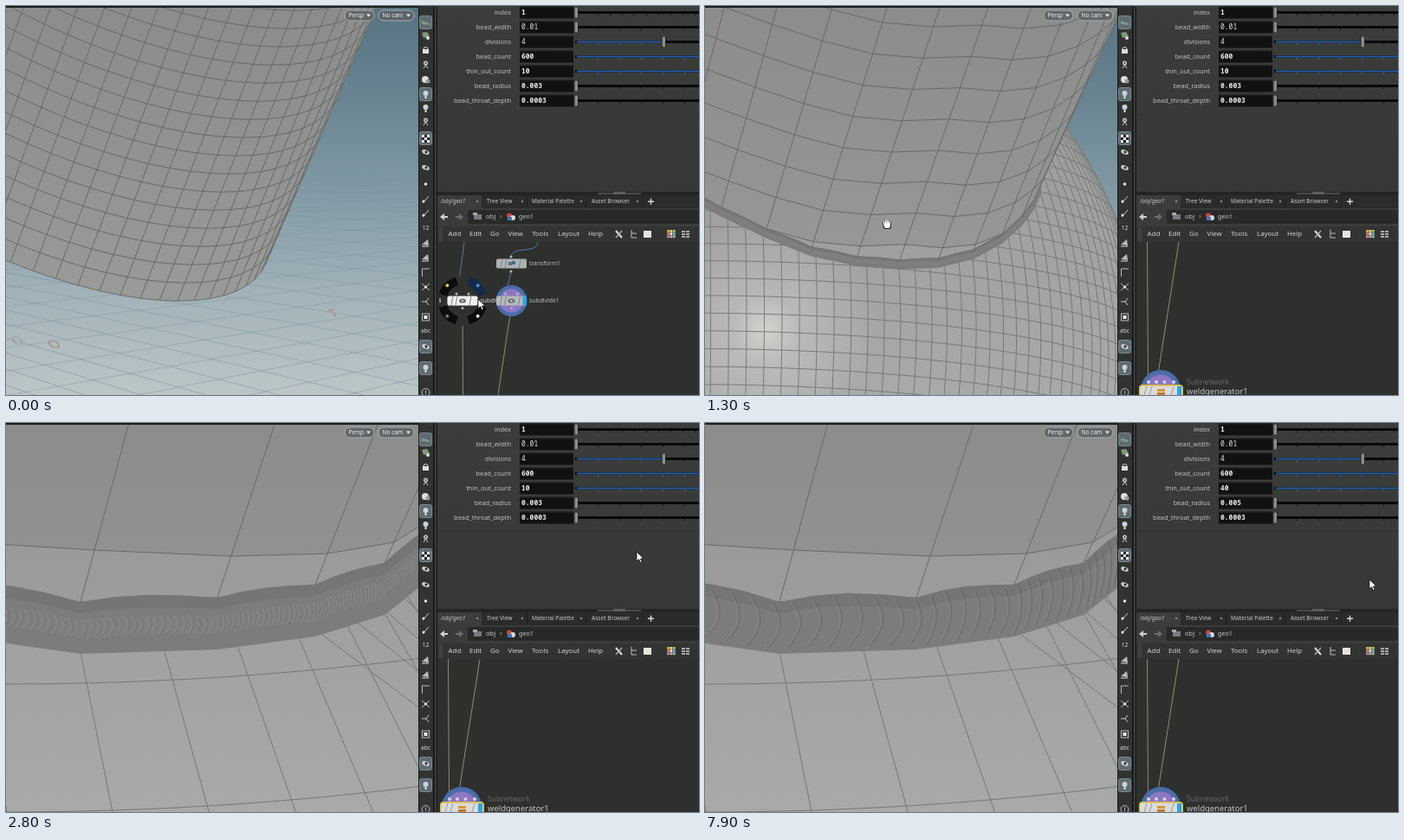
Recreate the animation shown at these times as an HTML page with a canvas. Size 800 px wide and 450 px high, loop 8 s.

```html
<!DOCTYPE html>
<html>
<head>
<meta charset="utf-8">
<style>
  html, body { margin: 0; width: 100%; height: 100%; overflow: hidden; background: #2e302e; }
  canvas { display: block; }
</style>
</head>
<body>
<canvas id="stage" width="800" height="450"></canvas>
<script>
const c = document.getElementById('stage').getContext('2d');
const LOOP = 8000, TAU = Math.PI * 2;
const lerp = (a, b, u) => a + (b - a) * u;
const ease = u => u * u * (3 - 2 * u);
const mix = (a, b, u) => a.map((v, i) => Array.isArray(v) ? mix(v, b[i], u) : lerp(v, b[i], u));
const noise = n => { const s = Math.sin(n * 127.1) * 43758.5; return s - Math.floor(s); };

function rect(x, y, w, h, fill) { c.fillStyle = fill; c.fillRect(x, y, w, h); }
function pill(x, y, w, h, r, fill, line) {
  c.beginPath(); c.roundRect(x, y, w, h, r);
  if (fill) { c.fillStyle = fill; c.fill(); }
  if (line) { c.strokeStyle = line; c.stroke(); }
}
function disc(x, y, r, fill) { c.fillStyle = fill; c.beginPath(); c.arc(x, y, r, 0, TAU); c.fill(); }
function trace(pts) { c.beginPath(); pts.forEach(p => c.lineTo(p[0], p[1])); }
function line(pts, color, w = 1) { trace(pts); c.strokeStyle = color; c.lineWidth = w; c.stroke(); c.lineWidth = 1; }
function fill(pts, color) { trace(pts); c.fillStyle = color; c.fill(); }
function text(s, x, y, size = 7.4, color = '#c8c9c8', style = '', align = 'left', family = '"Noto Sans", sans-serif') {
  c.font = `${style} ${size}px ${family}`;
  c.textAlign = align; c.textBaseline = 'middle'; c.fillStyle = color;
  c.fillText(s, x, y);
}
function gradient(y0, y1, ...stops) {
  const g = c.createLinearGradient(0, y0, 0, y1);
  stops.forEach((s, i) => g.addColorStop(i / (stops.length - 1), s));
  return g;
}
function glow(x, y, r, a) {
  const g = c.createRadialGradient(x, y, 0, x, y, r);
  g.addColorStop(0, `rgba(255,255,250,${a})`); g.addColorStop(0.3, `rgba(255,255,250,${a * .45})`);
  g.addColorStop(1, 'rgba(255,255,250,0)');
  rect(x - r, y - r, 2 * r, 2 * r, g);
}

// ---------- 3D view ----------
function backdrop() {
  rect(0, 0, 476, 450, gradient(0, 450, '#577382', '#6a8492', '#849ca8', '#a3b3b9', '#bcc6c8'));
  for (let n = 1; n < 40; n++) {
    const d = 5 + n * n * 0.55 + n * 4, a = Math.min(.5, .08 + n * .02);
    line([[-700, 185], [800, 185 + d * 1.4]], `rgba(112,138,152,${a})`);
    line([[1500, 185], [-100, 185 + d * 1.5]], `rgba(112,138,152,${a})`);
  }
}
function floorMarks() {
  for (const [x, y, s, col] of [[14, 388, '0', '#9aa0a3'], [56, 392, '0', '#b08f86'], [378, 356, '1', '#b08f86']]) {
    c.save(); c.translate(x, y); c.transform(1.3, -.15, .5, .7, 0, 0);
    text(s, 0, 0, 18, col, '', 'center'); c.restore();
  }
}

// Pose: [edge x, edge y, [slope, slope step, gap, gap step, row size], weld height, columns, rows, ball, closeness to the ball]
const angles = Array.from({ length: 21 }, (_, i) => (100 - 5 * i) * Math.PI / 180);
const cylinder = [
  angles.map(a => 4 + 296 * Math.cos(a) - 51 * Math.sin(a)),
  angles.map(a => 153 + 145 * Math.cos(a) + 120 * Math.sin(a)),
  [.355, .0037, 21, 0, 21]
];
const poses = [
  [1300, [
    [-30, 20, 72, 124, 176, 225, 270, 310, 343, 366, 380, 388],
    [207, 233, 258, 279, 290, 294, 292, 282, 264, 243, 224, 205],
    [.26, .018, 18, -6, 36], 11, [225, 300, 17.6, .25, .13, .011], [245, 21, 0, 0], [-13, 443, 526], 1]],
  [1700, [
    [-480, -365, -245, -125, -8, 107, 222, 316, 395, 447, 490, 520],
    [110, 140, 170, 190, 200, 209, 198, 183, 157, 129, 88, 40],
    [-.03, .05, 35, -5, 130], 38, [108, 250, 72, 3.5, .16, .07], [273, 88, .02, .00014], [-500, 1100, 1600], 0]],
  [2200, [
    [-680, -530, -380, -225, -70, 86, 244, 357, 437, 490, 525, 550],
    [80, 110, 140, 170, 185, 207, 202, 187, 162, 120, 70, 20],
    [-.03, .06, 60, -12, 190], 60, [85, 260, 97, 5.5, .2, .075], [302, 148, 0, .00013], [-700, 1700, 2400], 0]]
];
function poseAt(t) {
  if (t <= poses[0][0]) return poses[0][1];
  for (let i = 1; i < poses.length; i++)
    if (t < poses[i][0]) {
      const [a, b] = [poses[i - 1], poses[i]];
      return mix(a[1], b[1], (t - a[0]) / (b[0] - a[0]));
    }
  return poses[2][1];
}
function edge([xs, ys], i) {
  const k = Math.max(0, Math.min(xs.length - 2, Math.floor(i))), u = i - k;
  return [lerp(xs[k], xs[k + 1], u), lerp(ys[k], ys[k + 1], u)];
}
function tube(pose, welded) {
  const [xs, , [slope, slopeK, gap, gapK, size]] = pose, last = xs.length - 1;
  const up = (i, d) => { const [x, y] = edge(pose, i); return [x + (slope + slopeK * i) * d, y - d]; };
  const span = f => Array.from({ length: last + 10 }, (_, n) => f(n - 9));
  const row = r => span(i => up(i, Math.max(0, gap + gapK * Math.abs(i - 5) + (r - 1) * size)));
  const rim = span(i => up(i, 0));
  fill([...rim, up(last, 700), [-1500, -700], [-1500, 200]], gradient(0, 340, '#8b8d8b', '#919391', '#999b99'));
  if (welded) fill([...rim, ...row(1).reverse()], 'rgba(255,255,255,.08)');
  for (let i = -9; i <= last; i++) line([up(i, 0), up(i, 700)], '#686a68');
  for (let r = 1; r < 25; r++) line(row(r), '#686a68');
  line(rim, '#6c6e6c');
}
function ballMesh([cx, cy, R]) {
  const tilt = .17, step = Math.PI / 80;
  const put = (lat, lon) => {
    const x = Math.cos(lat) * Math.sin(lon), y = Math.sin(lat), z = Math.cos(lat) * Math.cos(lon);
    const depth = z * Math.cos(tilt) - y * Math.sin(tilt);
    return depth > 0 && [cx + R * x, cy - R * (y * Math.cos(tilt) + z * Math.sin(tilt))];
  };
  for (let a = -40; a <= 40; a++) {
    const lat = [], lon = [];
    for (let b = -40; b <= 40; b++) {
      lat.push(put(a * step, b * step));
      lon.push(put(b * step, a * step));
    }
    line(lat.filter(Boolean), '#737572', .9);
    line(lon.filter(Boolean), '#737572', .9);
  }
}
function sphere() {
  const ball = [26, 400, 424];
  const g = c.createRadialGradient(80, 380, 40, ...ball);
  ['#adafac', '#a5a7a4', '#9b9d9a', '#868987'].forEach((s, i) => g.addColorStop(i / 3, s));
  c.save();
  c.beginPath(); c.arc(...ball, 0, TAU); c.fillStyle = g; c.fill(); c.clip();
  glow(92, 345, 130, .5);
  ballMesh(ball);
  c.restore();
}
function plate([, , , , [x0, y0, dx, q, lean, leanK], [ry, size, tilt, curve], ball, near]) {
  c.save();
  c.beginPath(); c.arc(...ball, 0, TAU); c.clip();
  rect(0, 0, 476, 450, gradient(150, 450, '#9b9d9a', '#a2a4a1', '#a8aaa7'));
  if (near) {
    glow(70, 375, 130, .5 * near);
    c.globalAlpha = near;
    ballMesh(ball);
  }
  c.globalAlpha = 1 - near;
  for (let j = -12; j < 16; j++) {
    const x = x0 + dx * j - q * j * (j - 1), k = lean + leanK * j;
    line([[x - k * (y0 - 100), 100], [x, y0], [x + k * (450 - y0), 450]], '#767875');
  }
  for (let r = -8; r < 18; r++) {
    const pts = [];
    for (let x = 0; x <= 480; x += 20) pts.push([x, ry + r * size - tilt * x - curve * x * x]);
    line(pts, '#767875');
  }
  c.restore();
}
// Bead step along the seam, the share of its height each bead covers, darkness
const beads = [[.052, .34, .72, .13], [.105, .28, .75, .16], [.15, .02, .97, .22]];
function weld(pose, mode) {
  const h = pose[3], end = pose[0].length - 1, dip = mode === 2 ? .16 : .12;
  const at = (i, f) => {
    const [x, y] = edge(pose, i), swell = h * dip * Math.abs(Math.sin(Math.PI * i)) / (1 + .5 * Math.max(0, i - 5));
    return [x, y + h * f - (1 - f) * swell];
  };
  const strip = (f0, f1, color) => {
    const top = [], low = [];
    for (let i = 0; i <= end; i += .25) { top.push(at(i, f0)); low.unshift(at(i, f1)); }
    fill([...top, ...low], color);
  };
  strip(0, 1, '#7b7d7a');
  strip(0, .22, 'rgba(95,97,95,.25)');
  if (mode < 2) strip(.35, .7, 'rgba(150,152,148,.14)');
  if (h < 20) return;
  const [step, f0, f1, dark] = beads[mode];
  for (let i = 3, n = 0; i < end; i += step, n++) {
    const w = noise(n) * .08, a = at(i, f0 + w), b = at(i - step * .3, f1 - w), m = at(i + step * .9, (f0 + f1) / 2);
    for (const [dx, color] of [[0, `rgba(72,74,72,${dark})`], [-2.5, 'rgba(175,177,172,.12)']]) {
      c.beginPath(); c.moveTo(a[0] + dx, a[1]);
      c.quadraticCurveTo(m[0] + dx, m[1], b[0] + dx, b[1]);
      c.strokeStyle = color; c.lineWidth = 1.6; c.stroke();
    }
  }
  c.lineWidth = 1;
}
function view(t) {
  c.save();
  c.beginPath(); c.rect(0, 0, 476, 450); c.clip();
  backdrop();
  if (t >= 1000) {
    const pose = poseAt(t);
    plate(pose);
    tube(pose, true);
    weld(pose, t < 5200 ? 0 : t < 7300 ? 1 : 2);
  } else if (t >= 200 && t < 700) sphere();
  else { floorMarks(); tube(cylinder, false); }
  if (t >= 1500 && t < 2200) {
    disc(103, 245, 6, 'rgba(200,60,50,.7)');
    for (let d = -4; d <= 4; d += 4) {
      line([[103 + d, 239], [103 + d, 251]], '#e02a20');
      line([[97, 245 + d], [109, 245 + d]], '#e02a20');
    }
    c.beginPath(); c.arc(103, 245, 6.5, 0, TAU); c.strokeStyle = '#e02a20'; c.stroke();
  }
  rect(0, 0, 476, 2, '#1c1e1d');
  for (const [x, w, s] of [[391, 34, 'Persp'], [430, 41, 'No cam']]) {
    pill(x, 5, w, 12, 6, 'rgba(92,98,98,.85)', '#a9afb0');
    text(s, x + 4.5, 11, 6.6, '#f0f0f0');
    fill([[x + w - 9, 9.5], [x + w - 4, 9.5], [x + w - 6.5, 12.5]], '#f0f0f0');
  }
  c.restore();
}

// ---------- tool strip ----------
const tools = [[19, 'view', 1], [34, 'tag'], [51, 'lock'], [68, 'pin'], [85, 'ball'], [102, 'bulb', 1], [118, 'bulb'], [134, 'pin'],
  [153, 'check', 1], [169, 'eye'], [187, 'eye'], [206, 'dot'], [224, 'slash'], [240, 'slash'], [257, '12'], [274, 'fan'], [291, 'fan'],
  [308, 'corner'], [325, 'cross'], [342, 'fork'], [360, 'frame'], [376, 'abc'], [394, 'eye', 1], [419, 'bulb', 1], [447, 'info']];
const glyphs = {
  view: y => fill([[480, y - 2], [489, y + 1], [489, y + 3], [480, y + 2]], '#7b9a8a'),
  tag: y => { fill([[480, y - 3], [486, y - 4], [489, y + 1], [482, y + 3]], '#7d9a78'); disc(487, y + 3, 2, '#ddd'); },
  lock: y => { rect(481, y - 1, 7, 5, '#ddd'); c.beginPath(); c.arc(484.5, y - 1, 2.5, Math.PI, TAU); c.strokeStyle = '#ddd'; c.stroke(); },
  pin: y => { disc(484.5, y - 2, 2.5, '#ccc'); disc(484.5, y - 2, 1, '#333'); line([[482, y + 4], [484.5, y], [487, y + 4]], '#ccc'); },
  ball: y => { disc(484, y, 4, '#ddd'); disc(487, y + 2, 2.5, '#999'); },
  bulb: y => { disc(484.5, y - 1, 3, '#c9d3d8'); rect(483.5, y + 2, 2, 3, '#e4e4d8'); },
  check: y => { for (let n = 0; n < 9; n++) rect(480 + n % 3 * 3, y - 4 + Math.floor(n / 3) * 3, 3, 3, n % 2 ? '#222' : '#eee'); },
  eye: y => { c.beginPath(); c.ellipse(484.5, y, 4.5, 2.5, .4, 0, TAU); c.fillStyle = '#c8cccc'; c.fill(); disc(485, y, 1.4, '#222'); },
  dot: y => disc(484.5, y, 1.7, '#eee'),
  slash: y => { line([[481, y + 4], [488, y - 4]], '#ccc'); disc(482, y + 2, 1.5, '#eee'); },
  fan: y => { fill([[480, y + 2], [487, y - 4], [488, y + 3]], '#bbb'); line([[480, y + 4], [488, y + 4]], '#ddd'); },
  corner: y => line([[480.5, y + 5], [480.5, y - 4], [489, y - 4]], '#bbb'),
  cross: y => { line([[480, y - 4], [489, y + 4]], '#bbb'); line([[480, y + 4], [489, y - 4]], '#bbb'); disc(484.5, y, 1.6, '#eee'); },
  fork: y => { line([[480, y], [485, y], [488, y - 4]], '#ccc'); line([[485, y], [488, y + 4]], '#ccc'); },
  frame: y => { c.strokeStyle = '#bbb'; c.strokeRect(480.5, y - 4, 8, 8); rect(482.5, y - 2, 4, 4, '#eee'); },
  info: y => { c.beginPath(); c.arc(484.5, y, 4.5, 0, TAU); c.strokeStyle = '#bbb'; c.stroke(); text('i', 484.5, y, 7, '#eee', '', 'center'); }
};
function toolStrip() {
  rect(476, 0, 22, 450, '#191b1a');
  rect(477, 0, 16, 450, '#313332');
  rect(495, 0, 1.5, 450, '#454745');
  for (const [y, kind, lit] of tools) {
    if (lit) pill(477.5, y - 7.5, 14, 15, 2, '#5d6a71', '#7d898f');
    if (glyphs[kind]) glyphs[kind](y); else text(kind, 484.5, y, 6.5, '#ddd', '', 'center');
  }
}

// ---------- parameters ----------
function parameters(t) {
  rect(498, 0, 302, 216, gradient(0, 216, '#3b3d3b', '#363836'));
  rect(498, 124, 302, 1, '#333533');
  const thin = t < 5000 ? '10' : '40';
  const radius = t < 6800 ? '0.003' : t < 6900 ? '0.00' : '0.005';
  const rows = [['index', '1', 658], ['bead_width', '0.01', 658], ['divisions', '4', 759], ['bead_count', '600', 830],
    ['thin_out_count', thin, 830], ['bead_radius', radius, 658], ['bead_throat_depth', '0.0003', 658]];
  rows.forEach(([label, value, knob], i) => {
    const y = 7.5 + i * 17;
    text(label, 583, y, 7.4, '#bfc1bf', '', 'right');
    rect(593, y - 7, 62, 14, '#101110');
    rect(593, y - 7, 62, 1, '#242624');
    const picked = i === 4 && t >= 4800 && t < 5000 || i === 5 && t >= 6500 && t < 6800;
    if (picked) rect(594, y - 5, 5 + value.length * 4.8, 11, '#47688f');
    text(value, 595, y + .5, 8, '#e6e6e6', i === 1 || i === 2 ? '' : 'bold', 'left', '"Noto Sans Mono", monospace');
    rect(657, y - 1.5, 143, 3, '#080908');
    if (knob > 658) rect(659, y - 1, Math.min(knob, 800) - 659, 2, '#2b62a6');
    for (let x = 683; x < 800; x += i ? 25 : 14) rect(x, y + 1.5, 1, 2, knob > x ? '#356fb4' : '#151615');
    if (knob < 800) {
      rect(knob - 2.5, y - 6.5, 5, 13, '#1a1b1a');
      rect(knob - 1.5, y - 6, 3.5, 12, '#8b8d8a');
    }
  });
}

// ---------- network pane ----------
function paneHeader() {
  rect(498, 215, 302, 4, '#232523');
  rect(683, 216, 50, 2, '#4a4c4a'); rect(701, 215, 14, 3, '#5c5e5c');
  rect(498, 219, 302, 15, '#2a2c2a');
  rect(498, 219, 51, 15, '#3b3d3b');
  text('/obj/geo1', 502, 226, 6.6, '#c8c9c8', 'italic');
  [['Tree View', 555, 596], ['Material Palette', 607, 664], ['Asset Browser', 676, 729]].forEach(([s, x, dot]) => {
    text(s, x, 226, 6.6, '#c8c9c8');
    disc(dot, 226, 1.2, '#8b8d8b');
    rect(dot + 5, 220, 1, 13, '#1d1f1d');
  });
  disc(544, 226, 1.2, '#8b8d8b');
  rect(741, 225.5, 7, 1.4, '#ddd'); rect(743.8, 222.7, 1.4, 7, '#ddd');
  rect(498, 234, 302, 21, '#3a3c3a');
  pill(533, 236, 280, 16, 2, '#282a28');
  for (const [x, d, col] of [[506, 1, '#d0d0d0'], [523, -1, '#6c6e6c']]) {
    fill([[x - 5 * d, 244], [x, 240], [x, 248]], col); rect(x - (d < 0 ? 4 : 0), 243, 4, 2, col);
  }
  rect(540, 241, 9, 6, '#777b7d'); rect(539, 239, 5, 3, '#a5a9aa');
  text('obj', 554, 244, 7.5);
  text('›', 570, 243.5, 9, '#999');
  disc(581, 242.5, 3, '#c94a3c'); disc(585, 245, 3, '#d9dcdf'); rect(579, 244, 5, 4, '#3f76c4');
  text('geo1', 592, 244, 7.2);
  rect(498, 255, 302, 18, '#323432');
  rect(500, 256, 4, 16, '#3f413f');
  [['Add', 510.5], ['Edit', 535], ['Go', 559], ['View', 579.5], ['Tools', 607], ['Layout', 637], ['Help', 672]]
    .forEach(([s, x]) => text(s, x, 264, 7.9, '#d2d3d2'));
  line([[704, 260], [711, 268]], '#ddd', 2); line([[711, 260], [704, 268]], '#aaa', 1.5);
  line([[722, 259], [722, 268], [728, 268]], '#bbb'); line([[722, 263], [728, 263]], '#bbb');
  rect(736, 260, 9, 8, '#e6e6e0');
  const swatches = ['#e0a050', '#e8d070', '#9ac070', '#d07060', '#e0e0d0', '#70a8d0', '#b080c0', '#d0b080', '#88c0b0'];
  swatches.forEach((s, i) => rect(763 + i % 3 * 3.4, 259 + Math.floor(i / 3) * 3.2, 3, 2.8, s));
  for (let i = 0; i < 6; i++) rect(780 + i % 2 * 5, 260 + Math.floor(i / 2) * 3, 4, 2, '#a9aba9');
}
function halo(x, y, r) {
  disc(x, y, r, '#4a6da8');
  disc(x, y, r * .76, '#8d76c4');
}
function node(x, y, label, hot, shown) {
  if (shown) halo(x, y, 18);
  if (hot) {
    disc(x, y, 29, '#2e302e');
    const marks = ['#dddddd', '#777', '#e3c23c', '#4f8fd6'];
    marks.forEach((col, i) => {
      const a = Math.PI / 4 + i * Math.PI / 2;
      c.beginPath(); c.arc(x, y, 23.5, a - .5, a + .5);
      c.strokeStyle = i === 3 ? '#13294a' : '#0b0c0b'; c.lineWidth = 10; c.stroke(); c.lineWidth = 1;
      disc(x + 25 * Math.cos(a), y + 25 * Math.sin(a), 2, col);
    });
    text('i', x - 26, y, 7, '#ddd', 'bold', 'center');
  }
  for (const dx of [-7, 7]) disc(x + dx, y - 8, 1.5, '#b4b6b8');
  disc(x, y + 8.5, 1.5, '#b4b6b8');
  pill(x - 17.5, y - 5.5, 35, 11, 2, hot ? '#f0f0f0' : '#b7b9bb');
  for (const dx of [-12, -7, 9]) line([[x + dx - 1, y + 5], [x + dx + 1, y - 5]], '#83868a');
  if (shown) rect(x + 13, y - 5, 4.5, 10, '#28a5ea');
  c.beginPath(); c.ellipse(x, y, 4, 2.6, 0, 0, TAU); c.fillStyle = '#6a6e74'; c.fill();
  disc(x, y, 1.2, '#c5c8cc');
  text(label, x + 20.5, y, 6.8, hot ? '#dcdedc' : '#b9bbb9');
}
function network(t) {
  c.save();
  c.beginPath(); c.rect(498, 273, 302, 177); c.clip();
  rect(498, 273, 302, 177, '#2e302e');
  const blue = '#5a74ab', sand = '#8d8b6c';
  if (t < 1000) {
    const leftShown = t >= 200 && t < 700, leftHot = t < 350;
    line([[529, 273], [521, 333]], blue);
    c.beginPath(); c.moveTo(614, 273); c.bezierCurveTo(613, 288, 584, 276, 583, 291); c.strokeStyle = blue; c.stroke();
    line([[583, 307], [577, 333]], blue);
    line([[527, 350], [527.5, 450]], sand);
    line([[583, 350], [568, 450]], sand);
    text('transform1', 604, 298, 6.8, '#b9bbb9');
    disc(583, 290, 1.5, '#b4b6b8'); disc(583, 307, 1.5, '#b4b6b8');
    pill(566, 292.5, 35, 11, 2, '#aeb1b4');
    for (const x of [572, 577, 593]) line([[x - 1, 303], [x + 1, 293]], '#83868a');
    rect(580, 296, 4, 4, '#58708f'); rect(584, 295, 4, 4, '#47688f');
    node(527, 341, 'subdivide2', leftHot, leftShown);
    node(583.5, 341, 'subdivide1', !leftHot && t < 900, !leftShown);
    if (t >= 450 && t < 700) rect(597, 337, 4, 8, '#d0453c');
  } else {
    line([[510.5, 273], [511.5, 432]], sand);
    line([[547, 273], [522, 432]], sand);
    halo(526, 444, 23);
    for (const x of [512, 521, 530.5, 541]) disc(x, 435, 2, '#d5d6da');
    pill(501.5, 438.5, 50, 16, 3, '#dadbdc', '#e4bd2e');
    pill(502, 439, 49, 16, 2.5, null, '#e4bd2e');
    for (const x of [509, 515, 540]) line([[x - 2, 450], [x + 1, 440]], '#96989a');
    rect(545, 440, 5, 10, '#28a5ea');
    rect(522, 443, 9, 3, '#d9973a'); rect(522, 447, 9, 3, '#c17c28');
    text('Subnetwork', 556, 436, 8.66, '#656765');
    text('weldgenerator1', 556, 446.5, 9.45, '#c6c8c6');
  }
  c.restore();
}

// ---------- pointer ----------
const path = [[0, 545, 339], [300, 545, 339], [500, 600, 343], [700, 600, 343], [1000, 549, 441], [1100, 549, 441], [1300, 210, 252],
  [1700, 130, 250], [2200, 130, 250], [2700, 728, 149], [2900, 728, 149], [3600, 735, 125], [4500, 615, 77], [5000, 612, 78],
  [5400, 640, 82], [6100, 600, 83], [6500, 598, 92], [6700, 598, 92], [7000, 603, 96], [7200, 603, 96], [7900, 767, 181]];
function pointer(t) {
  let n = 1;
  while (n < path.length - 1 && path[n][0] < t) n++;
  const [a, b] = [path[n - 1], path[n]], u = ease(Math.min(1, (t - a[0]) / (b[0] - a[0])));
  const x = lerp(a[1], b[1], u), y = lerp(a[2], b[2], u);
  if (x < 476) {
    for (const [grow, color] of [[1, '#222'], [0, '#fff']]) {
      [-3, -1, 1, 3].forEach((d, i) => line([[x + d, y + 1], [x + d * 1.15, y - 4 + (i % 3 ? -.8 : .6)]], color, 1.6 + grow * 1.4));
      pill(x - 3.5 - grow, y - 1 - grow, 7.5 + 2 * grow, 6 + 2 * grow, 3, color);
    }
  } else if (x > 593 && x < 655 && y < 118) {
    line([[x, y - 5], [x, y + 5]], '#ddd');
    line([[x - 2, y - 5.5], [x + 2, y - 5.5]], '#ddd'); line([[x - 2, y + 5.5], [x + 2, y + 5.5]], '#ddd');
  } else {
    const arrow = [[0, 0], [0, 11], [2.6, 8.6], [4.4, 12.6], [6.2, 11.8], [4.5, 8], [8, 7.8], [0, 0]].map(([dx, dy]) => [x + dx, y + dy]);
    fill(arrow, '#fff'); line(arrow, '#111', .8);
  }
}

function frame(now) {
  const t = now % LOOP;
  view(t);
  toolStrip();
  parameters(t);
  paneHeader();
  network(t);
  pointer(t);
  requestAnimationFrame(frame);
}
requestAnimationFrame(frame);
</script>
</body>
</html>
```
